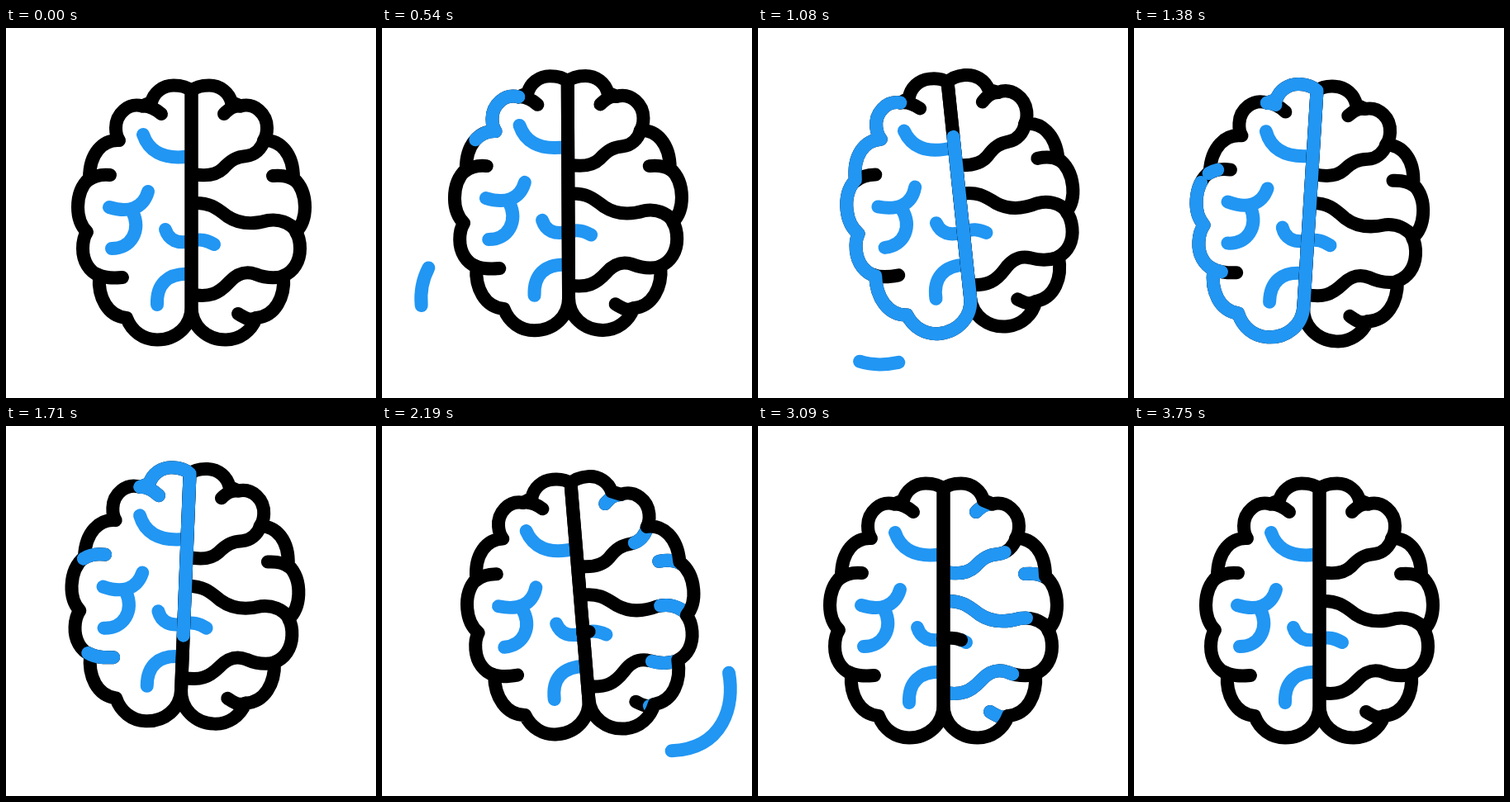
An HTML page with a canvas for the animation above (3.99 s loop, 448 by 448 pixels).

```html
<!DOCTYPE html>
<html lang="en">
<head>
<meta charset="utf-8">
<title>Brain</title>
<style>
  html, body { margin: 0; width: 100%; height: 100%; overflow: hidden; background: #fff; }
  canvas { display: block; width: 448px; height: 448px; }
</style>
</head>
<body>
<canvas id="stage" width="448" height="448"></canvas>
<script>
const ctx = document.getElementById('stage').getContext('2d');
const LOOP = 3990, STEP = 30, BLACK = '#000', BLUE = '#2196f3';
const PIVOT = { x: 224.5, y: 28 };

function shape(d) {
  const el = document.createElementNS('http://www.w3.org/2000/svg', 'path');
  el.setAttribute('d', d);
  return { path: new Path2D(d), length: el.getTotalLength() };
}

// One half of the brain, ending with the centre line and the top lobe
const half = shape('M165 94.5C148 90 133 104 133 121C133 127 134 132 137 136' +
  'C117 135 101 152 101 182C91 191 87 204 87 217C87 230 91 240 98 247' +
  'C94 253 93 260 93 267C93 283 101 295 113 300C111 326 123 349 146 351' +
  'C152 367 166 377.5 183 377.5C206 377.5 224.5 361 224.5 338L224.5 76' +
  'C219 71 211 69.5 203 69.5C190 69.5 179 78 176 90L165 94.5');

const leftCurls = [
  'M165 94.5C174 94 181 98 188 104',
  'M100 184C107 179 116 177 126 178',
  'M110 298C119 303 129 303 141 302'
].map(shape);

const rightCurls = [
  'M284 94.5C275 94 270 98 264 104',
  'M349 184C342 179 333 178 323 179'
].map(shape);

const rightFolds = [
  'M313 135C309 147 301 154 291 155C280 156 273 159 263 170C255 178 243 180 226 177',
  'M352 246C343 235 330 231 317 233C300 238 283 238 268 228C254 217 246 211 226 212',
  'M335 301C322 304 312 302 302 298C290 294 280 297 270 308C257 322 247 326 226 323',
  'M303 351C294 355 288 350 281 346'
].map(shape);

const innerFolds = [
  'M166 129C172 147 188 161 224 155',
  'M125 217C148 224 166 219 172 198',
  'M153 222C164 245 152 267 128 267',
  'M193 244C197 257 208 262 224 258',
  'M183 335C182 311 195 296 224 298'
].map(shape);
const bridge = shape('M224 258C236 255 243 257 252 262');

// Swooshes with the times of their leading and trailing ends
const swooshes = [
  { line: shape('M55 301C32 345 50 415 130 407'), head: [360, 860], tail: [660, 1320] },
  { line: shape('M393 303C406 350 388 430 287 404'), head: [1900, 2300], tail: [2040, 2790] },
  { line: shape('M168 392Q224 470 280 392'), head: [3330, 3730], tail: [3500, 3750] }
];

const swing = [[464, 0], [1025, -6.4], [1520, 5.8], [2055, -6.7], [2580, 5.7], [2985, 0]];
const hop = [[290, 0], [800, -23.5], [1310, 0], [1370, 0], [1865, -23.5], [2365, 0]];

function ease(t, [from, to]) {
  const p = Math.min(1, Math.max(0, (t - from) / (to - from)));
  return (1 - Math.cos(Math.PI * p)) / 2;
}

function track(keys, t) {
  let value = keys[0][1];
  for (let i = 1; i < keys.length; i++) {
    value += (keys[i][1] - keys[i - 1][1]) * ease(t, [keys[i - 1][0], keys[i][0]]);
  }
  return value;
}

function stroke(item, color, from = 0, to = 1) {
  if (to - from < 0.002) return;
  const full = from === 0 && to === 1;
  ctx.strokeStyle = color;
  ctx.setLineDash(full ? [] : [(to - from) * item.length, item.length * 2]);
  ctx.lineDashOffset = full ? 0 : -from * item.length;
  ctx.stroke(item.path);
}

const strokeAll = (items, ...style) => items.forEach(item => stroke(item, ...style));

function draw(t) {
  ctx.setTransform(1, 0, 0, 1, 0, 0);
  ctx.fillStyle = '#fff';
  ctx.fillRect(0, 0, 448, 448);
  ctx.lineCap = ctx.lineJoin = 'round';
  ctx.lineWidth = 16;
  ctx.translate(PIVOT.x, PIVOT.y + track(hop, t));
  ctx.rotate(track(swing, t) * Math.PI / 180);
  ctx.translate(-PIVOT.x, -PIVOT.y);

  const foldHead = ease(t, [1900, 2750]), foldTail = ease(t, [2900, 3500]);
  const bridgeCut = foldHead - foldTail;

  strokeAll([...leftCurls, ...rightCurls, ...rightFolds], BLACK);
  strokeAll(rightFolds, BLUE, foldTail, foldHead);
  strokeAll(rightCurls, BLUE, foldTail, ease(t, [1900, 2160]));
  strokeAll(innerFolds, BLUE);
  stroke(bridge, BLUE, bridgeCut, 1);
  stroke(bridge, BLACK, 0, bridgeCut);

  stroke(half, BLACK);
  ctx.save();
  ctx.translate(449, 0);
  ctx.scale(-1, 1);
  stroke(half, BLACK);
  ctx.restore();

  stroke(half, BLUE, ease(t, [1080, 2130]), ease(t, [300, 1380]));
  strokeAll(leftCurls, BLUE, ease(t, [1750, 2150]), ease(t, [1200, 1600]));
  swooshes.forEach(s => stroke(s.line, BLUE, ease(t, s.tail), ease(t, s.head)));
}

const start = performance.now();
function tick() {
  const t = (performance.now() - start) % LOOP;
  draw(Math.floor(t / STEP) * STEP);
  requestAnimationFrame(tick);
}
tick();
</script>
</body>
</html>
```
